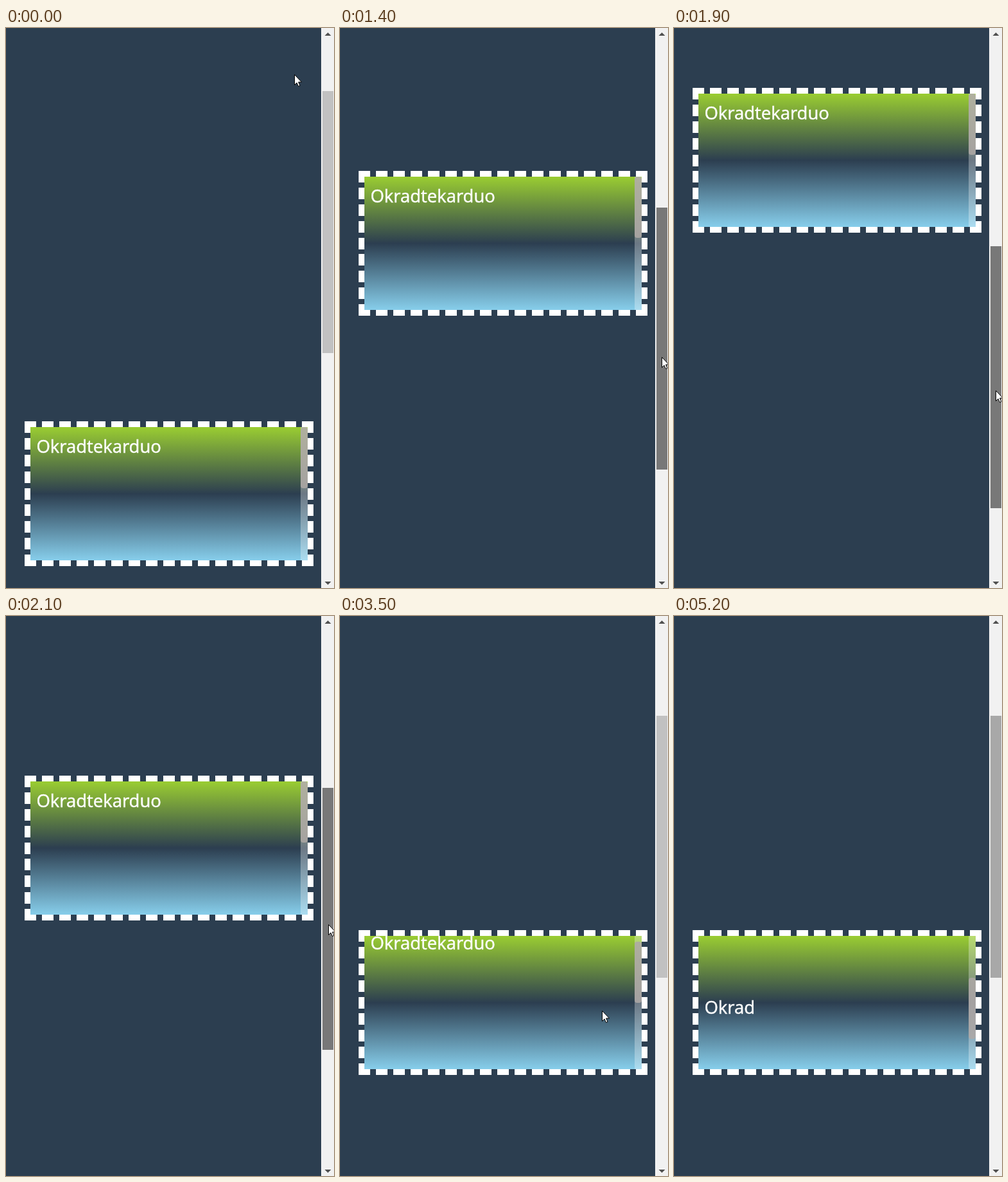
Animation, 511 px wide and 870 px high, one loop 5700 ms. Source, as an HTML page:

```html
<!DOCTYPE html>
<html lang="en">
<head>
<meta charset="utf-8">
<title>Scrolling box</title>
<style>
  html, body { margin: 0; height: 100%; overflow: hidden; background: #2c3e50; }
  svg { display: block; }
  text { font: 27.5px "Open Sans", "Noto Sans", sans-serif; fill: #fff; stroke: #fff; stroke-width: .5; }
  .dash { stroke: #fff; stroke-width: 9; shape-rendering: crispEdges; }
</style>
</head>
<body>
<svg width="511" height="870" viewBox="0 0 511 870">
  <defs>
    <linearGradient id="fill" x2="0" y2="1">
      <stop stop-color="yellowgreen"/>
      <stop offset=".5" stop-color="#2c3e50"/>
      <stop offset="1" stop-color="skyblue"/>
    </linearGradient>
  </defs>

  <g id="box">
    <path class="dash" stroke-dasharray="18 9" d="M0 4.5H450M0 220.5H450"/>
    <path class="dash" stroke-dasharray="18 7.875" d="M4.5 0V225M445.5 0V225"/>
    <svg x="9" y="9" width="432" height="207">
      <rect width="432" height="207" fill="url(#fill)"/>
      <g id="content">
        <text x="9.4" y="40">Okradtekarduo</text>
        <text x="9.4" y="262">Okrad</text>
      </g>
      <rect x="421" width="11" height="207" fill="#fff" opacity=".3"/>
      <rect id="innerThumb" x="421" width="11" height="95" rx="4" fill="#aea8a6" opacity=".85"/>
    </svg>
  </g>

  <rect x="491" width="20" height="870" fill="#f1f1f1"/>
  <path fill="#505050" d="M496.5 12L501.5 7L506.5 12ZM496.5 860L501.5 865L506.5 860Z"/>
  <rect id="pageThumb" x="493" width="17" height="407"/>

  <path id="cursor" fill="#fff" stroke="#000" stroke-linejoin="round"
        d="M.5 .5V16.5L4 13L6.5 18.5L9 17.5L6.6 12H11.5Z"/>
</svg>

<script>
const LOOP = 5700, STEP = 100;
const BOX_TOP = 611, THUMB_TOP = 98, PAGE_RATIO = 2.15, INNER_RATIO = 0.46;

// Turning points as [step, value, ...], eased in between; one step is 100 ms.
const scrollTurns = [[27, 0], [30, 243], [31, 243], [34.35, 0], [38, 227],
  [40, 180], [41, 180], [45, 2], [48, 213], [50, 141]];
const cursorTurns = [[0, 449, 72], [3, 357, 190], [6, 461, 304], [9, 501, 330], [18, 501, 578],
  [24, 502, 380], [27, 408, 613], [35, 408, 613], [38, 473, 661], [50, 473, 622], [52, 520, 500]];

const [box, content, innerThumb, pageThumb, cursor] =
  ["box", "content", "innerThumb", "pageThumb", "cursor"].map(id => document.getElementById(id));

const mix = (a, b, p) => a + (b - a) * p;
const smooth = p => p * p * (3 - 2 * p);
const progress = (step, start, end) => Math.min(1, Math.max(0, (step - start) / (end - start)));
const move = (el, x, y) => el.setAttribute("transform", `translate(${x} ${y})`);

function between(turns, step) {
  const i = Math.max(1, turns.findIndex(turn => turn[0] > step));
  const [from, to] = step >= turns.at(-1)[0] ? turns.slice(-2) : [turns[i - 1], turns[i]];
  const p = smooth(progress(step, from[0], to[0]));
  return from.slice(1).map((v, k) => Math.round(mix(v, to[k + 1], p)));
}

// The page thumb is dragged down, slowing at the end, then back up at an even pace.
function pageThumbAt(step) {
  if (step < 11) return THUMB_TOP;
  return Math.round(step < 18
    ? mix(100, 377, 1 - (1 - progress(step, 11, 17)) ** 1.5)
    : mix(374, 155, progress(step, 18, 24) ** 1.03));
}

function thumbColor(step) {
  if (step >= 10 && step <= 24) return "#787878";
  return step === 9 || step > 50 ? "#a8a8a8" : "#c1c1c1";
}

function draw(now) {
  const step = Math.floor(now % LOOP / STEP);
  const page = pageThumbAt(step);
  const [scroll] = between(scrollTurns, step);
  const inner = Math.round(scroll * INNER_RATIO);
  const boxTop = Math.round(BOX_TOP - (page - THUMB_TOP) * PAGE_RATIO);

  // While a thumb is held, the cursor rides on it.
  let [x, y] = between(cursorTurns, step);
  if (step >= 10 && step < 18) [x, y] = [501, page + 232];
  if (step >= 38 && step <= 50) y = boxTop + 9 + inner + 60;

  move(box, 29, boxTop);
  move(content, 0, -scroll);
  move(cursor, x, y);
  innerThumb.setAttribute("y", inner);
  pageThumb.setAttribute("y", page);
  pageThumb.setAttribute("fill", thumbColor(step));
}

const start = performance.now();
function tick() {
  draw(performance.now() - start);
  requestAnimationFrame(tick);
}
tick();
</script>
</body>
</html>
```
